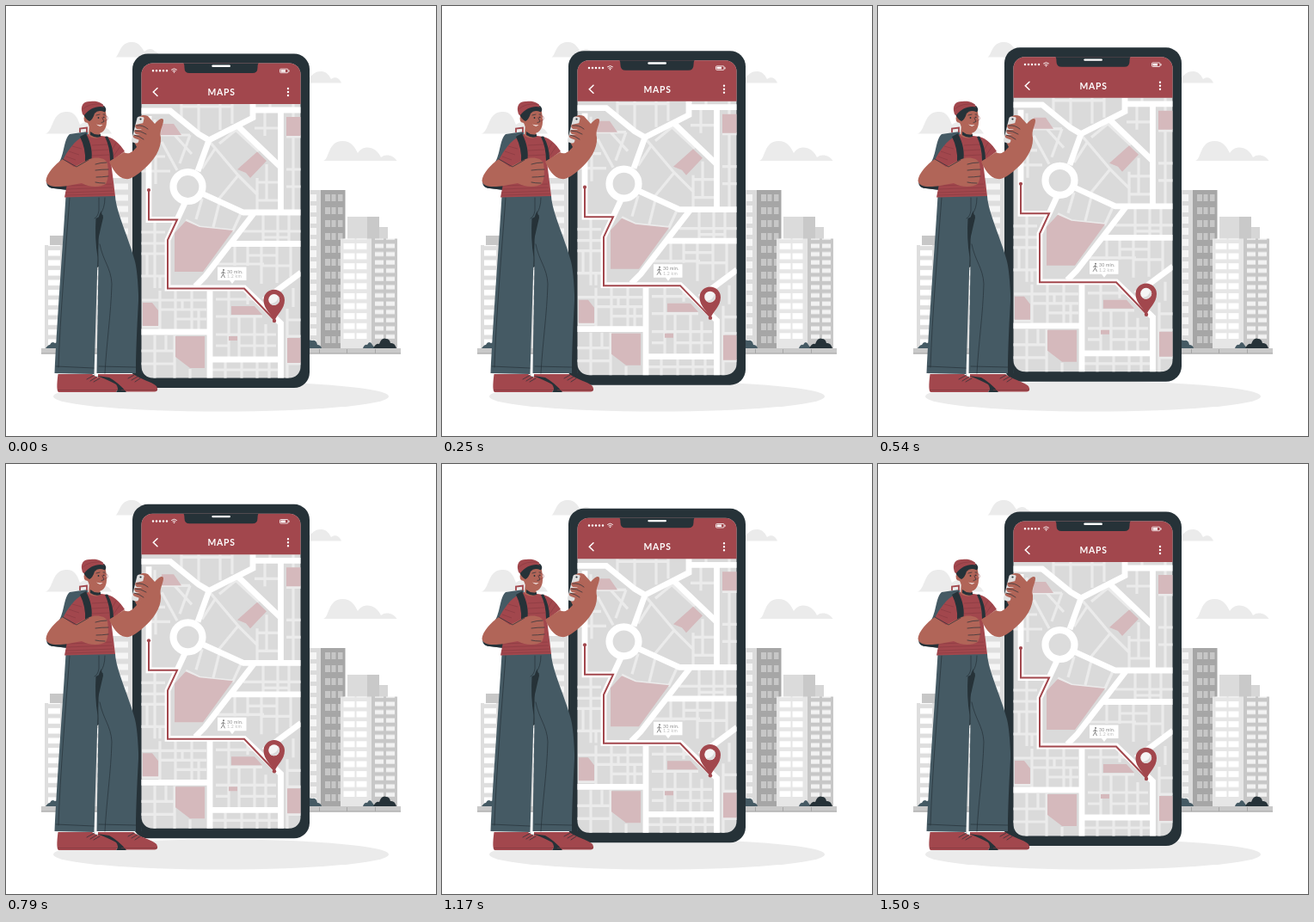
Animation, 500 px wide and 500 px high, one loop 1.54 s. Source, as an HTML page:

```html
<!DOCTYPE html>
<html lang="en">
<head>
<meta charset="utf-8">
<style>
html, body { margin: 0; width: 100%; height: 100%; overflow: hidden; background: #fff; }
svg { display: block; width: 100vw; height: 100vh; }
.pale { fill: #ebebeb; }
.red { fill: #a2474d; }
.skin { fill: #b16558; }
.dark { fill: #263238; }
.blue { fill: #455a64; }
.line { fill: none; stroke: #263238; stroke-width: .7; stroke-linecap: round; stroke-linejoin: round; }
.title { font: 700 10.4px Lato, sans-serif; letter-spacing: .8px; fill: #fff; text-anchor: middle; }
.note { font: 5.2px Lato, sans-serif; letter-spacing: .25px; fill: #888; }
</style>
</head>
<body>
<svg viewBox="0 0 500 500">
<defs>
  <clipPath id="screen"><rect x="157.5" y="66.5" width="185" height="366" rx="13"/></clipPath>
  <pattern id="wallLeft" x="45" y="282" width="19" height="11.5" patternUnits="userSpaceOnUse">
    <rect width="19" height="12" fill="#dedede"/><path d="M4 2h14v6.5H4z" fill="#fff"/>
  </pattern>
  <pattern id="wallTall" x="352" y="217" width="14" height="13" patternUnits="userSpaceOnUse">
    <rect width="14" height="13" fill="#dbdbdb"/><path d="M2 2h7v8H2z" fill="#f5f5f5"/>
  </pattern>
  <pattern id="wallShade" x="366" y="217" width="29" height="15" patternUnits="userSpaceOnUse">
    <rect width="29" height="15" fill="#a6a6a6"/><path d="M5 2h6v8H5zm7.500 0h5v8h-5zm7.500 0h5.500v8H20z" fill="#c7c7c7"/>
  </pattern>
  <pattern id="wallFront" x="389" y="274" width="36" height="11.600" patternUnits="userSpaceOnUse">
    <rect width="36" height="12" fill="#e6e6e6"/><path d="M3.500 2h13v7h-13zm15 0h12v7h-12z" fill="#fff"/>
  </pattern>
  <pattern id="wallSide" x="425" y="274" width="30" height="9.600" patternUnits="userSpaceOnUse">
    <rect width="30" height="10" fill="#c7c7c7"/><path d="M4 2.500h10v5H4zm13 0h10v5H17z" fill="#f2f2f2"/>
  </pattern>
</defs>

<g class="pale">
  <path d="M127.500 59.500C132 57 132 43 145 42C155 41 158 49 161 53C165 49 171 49 173 53C176 53 178 56 179 59.500Z"/>
  <path d="M46 148.500C55 146 53 124 69 123C80 122 83 130 86 138C96 130 108 136 110 142C118 140 121 145 123 148.500Z"/>
  <path d="M345 89.500C352 88 355 76 366 76C374 76 376 82 378 85C383 81 388 84 390 89.500Z"/>
  <path d="M369 180C376 179 374 157 391 157C402 157 406 165 409 171C416 160 431 164 436 176C442 171 451 174 454.500 180Z"/>
</g>
<ellipse cx="250" cy="454" rx="195" ry="17.500" class="pale"/>

<g>
  <path d="M51 267h30v11H51z" fill="#c7c7c7"/>
  <path d="M45 278h80v120H45z" fill="url(#wallLeft)"/>
  <path d="M118 200h34v198h-34z" fill="#dedede"/>
  <path d="M126 210h16M126 223h16M126 236h16M126 249h16M126 262h16M126 275h16M126 288h16" stroke="#f5f5f5" stroke-width="7"/>
  <path d="M340 214h26v184h-26z" fill="url(#wallTall)"/>
  <path d="M366 214h28.500v184H366z" fill="url(#wallShade)"/>
  <path d="M397 245h37v26h-37z" fill="#dbdbdb"/>
  <path d="M420 245h14v12h10v14h-24z" fill="#c9c9c9"/>
  <path d="M434 257h10v14h-10z" fill="#d6d6d6"/>
  <path d="M389 270.500h36V398h-36z" fill="url(#wallFront)"/>
  <path d="M425 270.500h30V398h-30z" fill="url(#wallSide)"/>
  <path d="M389 387h36v11h-36z" fill="#e6e6e6"/>
  <path d="M425 387h30v11h-30z" fill="#c7c7c7"/>
  <path d="M41 398h418v6.500H41z" fill="#c9c9c9"/>
  <path d="M41 404h418M364.500 399v5M396.500 399v5M429.500 399v5" stroke="#a6a6a6"/>
  <path class="blue" d="M46 398Q49 394 51 394Q53 389 57 392Q61 390 63 398ZM340 398Q350 386 356 389Q361 388 362 394Q366 394 367 398ZM415 398Q417 393 420 394Q423 388 426 394L429 398Z"/>
  <path class="dark" d="M427 398Q430 392 434 393Q437 385 442 387Q446 387 447 392Q452 391 454 398Z"/>
</g>

<g id="phone">
  <rect x="147" y="55.500" width="206" height="388.500" rx="18" class="dark"/>
  <g clip-path="url(#screen)">
    <path d="M157 66h186v367H157z" fill="#dadada"/>
    <g fill="none" stroke="#ebebeb" stroke-width="3.200">
      <path d="M204 114V133M224 114V146M249 114V144M263 114V137M204 117H262M301 120V151M289 142H318M307 114V120"/>
      <path d="M237 158L270 197L247 225M266 143L294 169M270 197L293 220M270 142L248 160M228 189L243 166M292 200V238M303 184V226M292 205H318M292 226H318M334 114V240M326 152H343M326 190H343M326 210H343"/>
      <path d="M173 132V150M157 150H214M181 158L199 191M157 175H185M174 175V207M157 192H191M214 150L202 183M196 150L216 172"/>
      <path d="M228 224L221 248M248 229L241 257M274 239L264 261L225 257L209 249"/>
      <path d="M299 241V276M316 241V276M329 241V276M276 262H343M299 269H329M246 300H300M266 278V302M281 278V302M297 278V323M315 278V322M331 278V315M281 290H315M297 302H331"/>
      <path d="M157 263H185M173 251V328M157 276H186M157 288H186M157 314H186M179 314V328M164 288V314"/>
      <path d="M158 342H233M179 331V376M197 331V376M216 331V376M179 353H233M197 364H233M205 342V353M158 373H178M224 353V376"/>
      <path d="M244 341H290M259 331V408M244 361H298M271 361V408M244 382H314M289 361V408M302 370V408M271 395H314M244 395H259M281 331V347"/>
      <path d="M173 383V433M157 401H197M157 416H197M186 383V401M196 383V433M214 422V433M255 414V433M274 414V433M292 414V433M306 414V433M240 423H316M327 352V433M327 384H343M327 416H343M334 328V350M327 365H343"/>
    </g>
    <g fill="#d5b9bc">
      <path d="M181 137h14l9 13h-24zM269 190L292 169.500L303 180L284 200L279 194ZM326 129h18v22h-18z"/>
      <path d="M196 264L209 250L225 257L264 261L229 309H196ZM159 345h11l7 9v18h-18z"/>
      <path d="M197 384h34v37h-17l-17-13zM262 349h27l9 10h-36zM327 386h17v29h-17zM259 384h10v5h-10z"/>
    </g>
    <g fill="none" stroke="#fff" stroke-width="6.800">
      <path d="M157 122H191L224 149L236 156M223 192L236 156L287 130V114M287 121H343M319.500 121V240M270 140L319 187"/>
      <path d="M230 219L276 240H343M289 240L231 315L220 326M261 276.500H343M343 310L300 342"/>
      <path d="M166 128V248.500H199M208 229L188 272V328H277L319.500 369V433M237 328V433M157 379H240M237 411H320"/>
    </g>
    <circle cx="211.500" cy="210" r="17" fill="#dcdcdc" stroke="#fff" stroke-width="8.200"/>
    <path d="M166 214V248.500H199L188 272V328.500H277L312 365" fill="none" stroke="#a2474d" stroke-width="2"/>
    <circle cx="166" cy="214" r="2.100" class="red"/>
    <path d="M246 303.500H279.500V319H266L263 323L260 319H246Z" fill="#fff"/>
    <circle cx="253" cy="307" r="1" fill="#777"/>
    <path d="M252.500 309V312L250 316M252.500 312L254.500 316M250 311L252.500 309L255 311" fill="none" stroke="#777" stroke-width=".9"/>
    <text x="257" y="310.600" class="note">30 min.</text>
    <text x="257" y="316" class="note" style="fill:#bbb">1.2 km</text>
    <circle cx="312" cy="366" r="2.200" class="red"/>
    <path class="red" d="M312 367C309 358 299.500 353 299.500 342A12.200 12.200 0 0 1 324 342C324 353 315 358 312 367Z"/>
    <circle cx="311.700" cy="341.500" r="6.500" fill="#f5f5f5"/>
    <path d="M317 338A6.500 6.500 0 0 1 307 346Q315 346 317 338Z" fill="#dbdbdb"/>

    <path class="red" d="M157 66H343V114H157Z"/>
    <path class="dark" d="M206 66H294Q292.500 67 292.500 72Q292.500 78 286.500 78H213.500Q207.500 78 207.500 72Q207.500 67 206 66Z"/>
    <path d="M171 75.300H188" stroke="#fff" stroke-width="2.500" stroke-linecap="round" stroke-dasharray="0 4"/>
    <path d="M192.200 74.300Q195.500 71.500 198.800 74.300M193.600 75.800Q195.500 74.200 197.400 75.800" fill="none" stroke="#fff" stroke-width=".9"/>
    <circle cx="195.500" cy="77" r=".8" fill="#fff"/>
    <rect x="318.500" y="73.200" width="9.500" height="4.500" rx="1" fill="none" stroke="#fff" stroke-width=".8"/>
    <path d="M319.500 74.200h5.500v2.500h-5.500zM328.500 74.500h1v2h-1z" fill="#fff"/>
    <path d="M176 95.500L171.300 100L176 104.500" fill="none" stroke="#fff" stroke-width="1.500" stroke-linecap="round"/>
    <path d="M328 96V104.200" stroke="#fff" stroke-width="2.400" stroke-linecap="round" stroke-dasharray="0 4"/>
    <text x="250.600" y="104" class="title">MAPS</text>
  </g>
  <path d="M240.500 69.800H259.800" stroke="#fff" stroke-width="2.400" stroke-linecap="round"/>
</g>

<g>
  <path class="blue" d="M74 149C67 155 68 173 61 183L49 199C45 207 48 212 56 212L72 214L97 165L95 146Z"/>
  <path class="dark" d="M61 197L49 202Q46 211 55 212L72 214L75 190Z"/>
  <path d="M86 147V142.500L94 141.500V147" fill="none" stroke="#a2474d" stroke-width="1.800"/>

  <path class="red" d="M60.500 428H100C106 433 119 435 127 440Q131 445 128 449H61Q58 447 60.500 428Z"/>
  <path class="red" d="M107 428H148C156 434 170 437 175 442Q178 448 173 448.500H131Q118 437 107 433Z"/>
  <path class="dark" d="M106 430Q119 435 128 440Q132 445 128 449H140Q131 438 120 432Z"/>
  <path d="M60 446.500H129M134 446.500H176" stroke="#7a343a" stroke-width=".6"/>
  <path class="line" d="M94 434L103 429M98 436L106 431M102 437L109 433M142 433L149 429M146 435L153 431M150 437L156 433"/>

  <path class="dark" d="M102 230H117L114 300L106 304Z"/>
  <path class="blue" d="M69.500 221L117 221L106 250C103 270 107 282 106.500 295L102.500 428L56.500 427C59 370 66 280 69.500 221Z"/>
  <path class="blue" d="M104 221H127C128 240 143 270 150 297C156 322 154 380 157.500 427H105.500L107.500 296L107 272L113 246Z"/>
  <path class="dark" d="M104.500 247L113 243Q107 262 107.500 276L106.500 292Q103 270 104.500 247Z"/>
  <path class="dark" d="M155 325C153 360 151 400 151 427H157.500C156 390 157 350 155 325Z"/>
  <path class="line" d="M109 277C113 297 122 304 123 323C122 360 117 390 115 427M74 223C69 290 63 360 61 420M108 223V238Q107 245 103 247M115 223Q115 236 109 243M58 419L102 421M108 419L151 420"/>

  <path class="red" d="M91 151C79 157 72 168 66 179L75 187L68 222.500L127 221L122 181L138 169C132 160 126 154 118 152L96 149Z"/>
  <path d="M70 209L123 207M70 213L124 211M69 217L125 215M69 220L126 218.500M77 163L88 166M73 169L85 173M70 175L81 179M100 162L118 161M100 168L119 167M100 174L120 173M128 159L122 170M133 163L124 176" stroke="#863a40" stroke-width=".6"/>
  <path class="dark" d="M86 152L93 148C99 160 101 171 99 181H92Q93 166 86 152ZM115 152L118 151.500Q125 164 125 178L121 180Q121 164 115 152Z"/>
  <path class="skin" d="M97 136L109 145L110 152Q104 156 96 151Z"/>
  <path class="dark" d="M98 146Q104 151 110 149L110 152Q104 154 98 150Z"/>

  <path class="skin" d="M66 178C57 184 47 195 46.500 203C47 211 60 211 72 209L88 206C97 211 109 211 116 207C120 200 119 190 118 183C116 176 104 175 97 178L79 187Z"/>
  <path class="line" d="M66 178L82 187L96 179M117 182Q110 182 104 184M119 190Q111 190 104 191M119 198Q111 199 105 199M115 206Q108 206 104 205" stroke-width=".6"/>

  <path class="skin" d="M120 181L137 170C142 173 146 171 152 164L149 158C145 155 148 149 150 145L153 134C153 127 160 126 165 128L173 137C179 130 183 130 183 133C183 139 178 145 180 153C181 166 172 180 160 190C152 197 145 202 139 201C130 200 124 190 120 181Z"/>
  <path d="M152.500 130Q153 128.500 155 128.500L159 129Q161 129.500 160.500 131L154 158Q153 160 150.500 159.500L147.500 158.500Q145.500 158 146 156Z" fill="#e0e0e0"/>
  <circle cx="156.500" cy="131.500" r="1.100" class="dark"/>
  <path class="skin" d="M151 138L160 136Q166 139 165 144L152 143Q149 140 151 138ZM150 144L163 144Q165 149 161 151L151 149Q148 146 150 144ZM149 150L160 150Q162 155 158 157L150 154Q146 152 149 150Z"/>
  <path class="line" d="M152 139Q159 138 165 143M150 145Q157 145 163 149M149 150Q155 151 160 155" stroke-width=".6"/>

  <path class="skin" d="M95 122L115 119C117 127 118.500 138 115 143C111 150 104 149 98 143L95 136Q89 135 91 128Q93 125 95 128Z"/>
  <path class="dark" d="M90 126C96 117 106 113 114 116Q118 120 115 123.500Q107 120 103 125Q101 132 97 134Q92 131 90 126Z"/>
  <path class="red" d="M88.500 124C86 115 91 110.500 98 111C106 110 112 112 114 117.500C106 115.500 97 119 91 127Q89 127 88.500 124Z"/>
  <path d="M89 120Q98 112 113 114.500" fill="none" stroke="#863a40" stroke-width=".6"/>
  <path class="line" d="M105 127L109 126M113 126L115 126M112 130L114 134.500L111 135.500"/>
  <path d="M105 137.500Q109 139 112.500 138Q109 141.500 105 137.500Z" fill="#fff"/>
  <circle cx="107.500" cy="130" r=".9" class="dark"/>
  <circle cx="113.800" cy="129.500" r=".8" class="dark"/>
  <circle cx="115.300" cy="130.500" r="3" fill="none" stroke="#863a40" stroke-width=".5"/>
</g>
</svg>
<script>
const phone = document.getElementById("phone");
const LOOP = 1540, FRAMES = 37, BOB = 1500, LIFT = 10, PHASE = 28;

// Linear rise and fall, stepped at 24 frames per second.
const lift = ms => LIFT * (1 - Math.abs(1 - ((ms + PHASE) % BOB) / BOB * 2));

function draw(now) {
  const step = Math.floor(((now % LOOP) + 3) * FRAMES / LOOP) % FRAMES;
  const y = lift(0) - lift(step * 1000 / 24);
  phone.setAttribute("transform", `translate(0 ${y.toFixed(3)})`);
  requestAnimationFrame(draw);
}
draw(performance.now());
</script>
</body>
</html>
```
